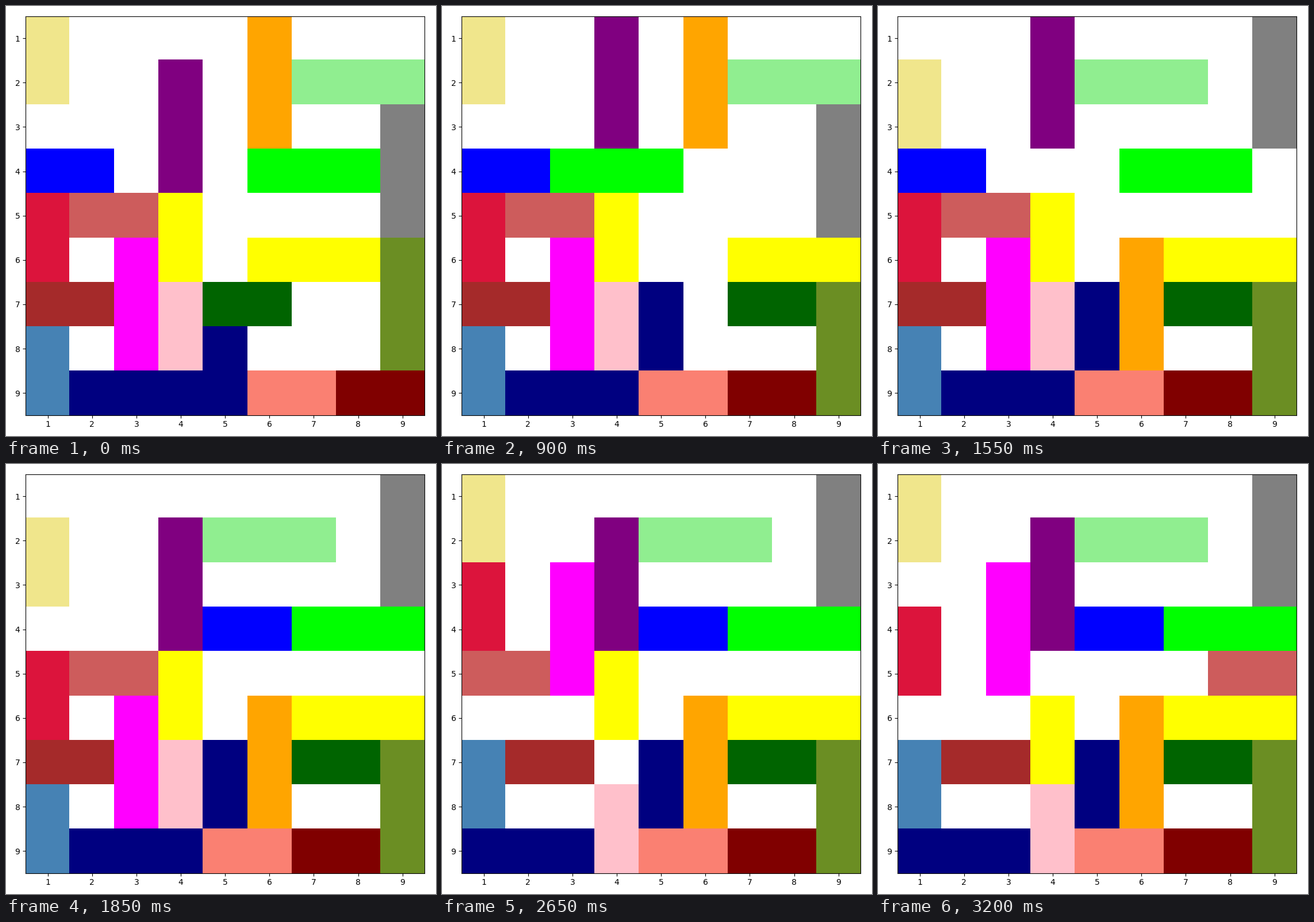
A matplotlib script that plays this animation: 748 by 748 pixels, repeating every 3250 ms.

```python
import matplotlib.pyplot as plt
from matplotlib.animation import FuncAnimation
from matplotlib.patches import Rectangle
from matplotlib.transforms import Affine2D

SIZE = 748
N = 9
LEFT, TOP, SIDE = 34.1, 17.6, 694.1  # axes frame, pixels from the top left
GRID_X, GRID_Y, CELL = 33, 16, 77.3  # cells, snapped to whole pixels

# key: colour, direction, lane, first cell, length
CARS = {
    "K": ("khaki", "v", 1, 1, 2),
    "C": ("crimson", "v", 1, 5, 2),
    "T": ("steelblue", "v", 1, 8, 2),
    "M": ("magenta", "v", 3, 6, 3),
    "P": ("purple", "v", 4, 2, 3),
    "Y": ("yellow", "v", 4, 5, 2),
    "I": ("pink", "v", 4, 7, 2),
    "N": ("navy", "v", 5, 8, 2),
    "O": ("orange", "v", 6, 1, 3),
    "G": ("gray", "v", 9, 3, 3),
    "D": ("olivedrab", "v", 9, 6, 3),
    "E": ("lightgreen", "h", 2, 7, 3),
    "B": ("blue", "h", 4, 1, 2),
    "L": ("lime", "h", 4, 6, 3),
    "R": ("indianred", "h", 5, 2, 2),
    "W": ("yellow", "h", 6, 6, 3),
    "U": ("brown", "h", 7, 1, 2),
    "F": ("darkgreen", "h", 7, 5, 2),
    "V": ("navy", "h", 9, 2, 3),
    "S": ("salmon", "h", 9, 6, 2),
    "X": ("maroon", "h", 9, 8, 2),
}

# One step per frame: a car moves one cell, "." waits
PLAN = """
. F+ F+ N- S- X- D+ W+ B+ C- . P- .
C+ B- L- L- L- K+ O+ O+ E- E- O+ O+
O+ G- G- L+ L+ L+ L+ B+ B+ B+ B+ P+ . . . . .
K- C- C- R- M- M- U+ T- V- I+ M-
Y+ M- R+ R+ R+ C+ R+ R+ R+ R+ M+
""".split()


def positions():
    pos = {key: car[3] for key, car in CARS.items()}
    states = [dict(pos)]
    for step in PLAN:
        if step != ".":
            pos[step[0]] += 1 if step[1] == "+" else -1
        states.append(dict(pos))
    return states


def edge(k):
    return int(CELL * k + 0.55)


def place(patch, key, start):
    _, way, lane, _, length = CARS[key]
    col, row = (lane, start) if way == "v" else (start, lane)
    w, h = (1, length) if way == "v" else (length, 1)
    x0, x1 = edge(col - 1), edge(col - 1 + w)
    y0, y1 = edge(row - 1), edge(row - 1 + h)
    patch.set_bounds(GRID_X + x0, GRID_Y + y0, x1 - x0, y1 - y0)


fig = plt.figure(figsize=(SIZE / 100, SIZE / 100), dpi=100, facecolor="white")
ax = fig.add_axes([LEFT / SIZE, 1 - (TOP + SIDE) / SIZE, SIDE / SIZE, SIDE / SIZE])
ax.set(xlim=(0.5, N + 0.5), ylim=(N + 0.5, 0.5),
       xticks=range(1, N + 1), yticks=range(1, N + 1))

pixels = Affine2D().scale(1 / SIZE, -1 / SIZE).translate(0, 1) + fig.transFigure
patches = {}
for key, car in CARS.items():
    patch = Rectangle((0, 0), 1, 1, color=car[0], lw=0,
                      antialiased=False, transform=pixels)
    patches[key] = ax.add_patch(patch)

STATES = positions()


def draw(i):
    for key, start in STATES[i].items():
        place(patches[key], key, start)
    return list(patches.values())


anim = FuncAnimation(fig, draw, frames=len(STATES), interval=50,
                     repeat=True, repeat_delay=0)
plt.show()
```
